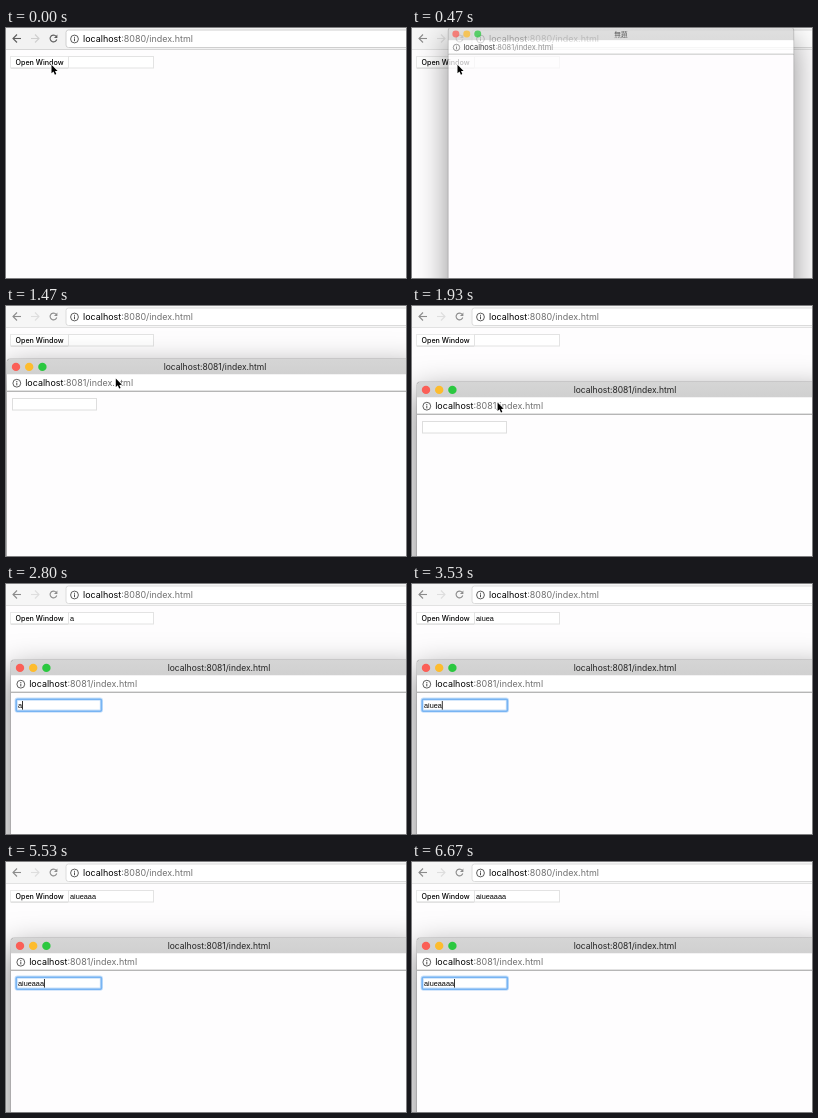
Animation of 400x250 px, one loop 6.79 s. Source, as an HTML page with a canvas:

```html
<!DOCTYPE html>
<html lang="en">
<head>
<meta charset="utf-8">
<title>Linked inputs</title>
<style>
html, body { margin: 0; width: 100%; height: 100%; overflow: hidden; background: #fefefe; }
canvas { display: block; width: 400px; height: 250px; }
</style>
</head>
<body>
<canvas id="stage"></canvas>
<script>
const W = 400, H = 250, LOOP = 6790, STEP = 1000 / 15;
const UI = 'Inter, Roboto, sans-serif';
const FIELD = '"Liberation Sans", Arial, sans-serif';
const CJK = '"Noto Sans CJK JP", "Noto Sans CJK", sans-serif';
const PAGE = '#fefdfe';
const POPUP = { w: 416, h: 346 };

const canvas = document.getElementById('stage');
const ctx = canvas.getContext('2d');
const dpr = window.devicePixelRatio || 1;
canvas.width = W * dpr;
canvas.height = H * dpr;

const mix = (a, b, p) => a + (b - a) * p;
const clamp = v => Math.max(0, Math.min(1, v));
const ease = p => p * p * (3 - 2 * p);

// [tick, number of characters]
const TYPING = [
  [39, 1], [43, 2], [44, 3], [45, 4], [46, 5], [47, 6], [48, 5], [49, 4],
  [53, 5], [56, 6], [59, 7], [62, 8], [67, 7], [69, 6], [71, 5],
  [73, 4], [76, 5], [79, 6], [82, 7], [84, 8]
];
// window and cursor while the popup is dragged, one entry per tick from 20
const DRAG = [
  { x: 1, y: -9, cx: 107, cy: 18.5 },
  { x: 1, y: 24, cx: 108.5, cy: 50 },
  { x: 1, y: 53, cx: 109.8, cy: 72.5 },
  { x: 5, y: 76, cx: 111, cy: 79 }
];

function rect(x, y, w, h, color) {
  ctx.fillStyle = color;
  ctx.fillRect(x, y, w, h);
}

function frame(x, y, w, h, color, fill) {
  rect(x, y, w, h, fill);
  ctx.strokeStyle = color;
  ctx.lineWidth = 1;
  ctx.strokeRect(x + .5, y + .5, w - 1, h - 1);
}

function text(str, x, y, size, color, family = UI, align = 'left', weight = 400) {
  ctx.font = `${weight} ${size}px ${family}`;
  ctx.textAlign = align;
  ctx.textBaseline = 'alphabetic';
  ctx.fillStyle = color;
  ctx.fillText(str, x, y);
  return ctx.measureText(str).width;
}

function line(points, color, width) {
  ctx.beginPath();
  points.forEach(([x, y]) => ctx.lineTo(x, y));
  ctx.strokeStyle = color;
  ctx.lineWidth = width;
  ctx.stroke();
}

function topRounded(x, y, w, h, r) {
  ctx.moveTo(x, y + h);
  ctx.lineTo(x, y + r);
  ctx.quadraticCurveTo(x, y, x + r, y);
  ctx.lineTo(x + w - r, y);
  ctx.quadraticCurveTo(x + w, y, x + w, y + r);
  ctx.lineTo(x + w, y + h);
  ctx.closePath();
}

function infoIcon(x, y) {
  ctx.beginPath();
  ctx.arc(x, y, 3.9, 0, Math.PI * 2);
  ctx.strokeStyle = '#4c4c4c';
  ctx.lineWidth = .9;
  ctx.stroke();
  rect(x - .5, y - .6, 1, 2.8, '#4c4c4c');
  rect(x - .5, y - 2.2, 1, 1, '#4c4c4c');
}

function address(port, x, y, size) {
  const host = text('localhost', x, y, size, '#000');
  text(`:${port}/index.html`, x + host, y, size, '#707070');
}

function arrow(x, y, dir, color) {
  line([[x - 4 * dir, y], [x + 4 * dir, y]], color, 1.1);
  line([[x, y - 4], [x + 4 * dir, y], [x, y + 4]], color, 1.1);
}

function reload(x, y, color) {
  ctx.beginPath();
  ctx.arc(x, y, 3.4, .3, Math.PI * 1.75);
  ctx.strokeStyle = color;
  ctx.lineWidth = 1.1;
  ctx.stroke();
  ctx.beginPath();
  ctx.moveTo(x + 3.9, y - 4);
  ctx.lineTo(x + 3.9, y - .5);
  ctx.lineTo(x + .5, y - .5);
  ctx.fillStyle = color;
  ctx.fill();
}

function mainWindow(active, pressed, value) {
  rect(0, 0, W, H, PAGE);
  rect(0, 0, W, 21, active ? '#f2f2f2' : '#f6f6f6');
  rect(0, 21, W, 1, active ? '#d6d6d6' : '#e2e2e2');
  const ink = active ? '#5c5c5c' : '#8c8c8c';
  arrow(11, 10.5, -1, ink);
  arrow(29, 10.5, 1, active ? '#cfcfcf' : '#dedede');
  reload(47.5, 10.5, ink);

  ctx.beginPath();
  ctx.roundRect(60, 2, 360, 17.5, 2.5);
  ctx.fillStyle = '#fff';
  ctx.fill();
  ctx.strokeStyle = active ? '#cbcbcb' : '#d8d8d8';
  ctx.lineWidth = .9;
  ctx.stroke();
  infoIcon(68.5, 11);
  address(8080, 77, 13.9, 8.95);

  frame(4, 28, 59, 12.5, '#e9e9e9', pressed ? '#d6d6d6' : '#fff');
  rect(5, 39.7, 57, .8, '#d2d2d2');
  text('Open Window', 9.5, 37.3, 7.15, '#000', UI, 'left', 500);
  frame(62, 28, 86, 12.5, '#e3e3e3', '#fff');
  text(value, 64, 37.3, 7.3, '#000', FIELD);
}

function popupShadow(x, y, w, h, alpha) {
  ctx.save();
  ctx.beginPath();
  ctx.rect(-100, -100, W + 200, H + 200);
  topRounded(x, y, w, h, 3.5);
  ctx.clip('evenodd');
  ctx.globalAlpha = alpha;
  ctx.shadowColor = 'rgba(0,0,0,.5)';
  ctx.shadowBlur = 32 * dpr;
  ctx.shadowOffsetY = 11 * dpr;
  ctx.beginPath();
  topRounded(x, y, w, h, 3.5);
  ctx.fillStyle = '#000';
  ctx.fill();
  ctx.shadowColor = 'transparent';
  ctx.strokeStyle = 'rgba(0,0,0,.14)';
  ctx.lineWidth = 1.4;
  ctx.stroke();
  ctx.restore();
}

function popupField(value, focused, caret) {
  frame(5, 39, 85, 12.5, '#dedede', '#fff');
  if (focused) {
    [[3.2, '#c9e1fa'], [1.6, '#78b4f3']].forEach(([width, color]) => {
      ctx.beginPath();
      ctx.roundRect(5.2, 39.2, 85.2, 12, 1.2);
      ctx.strokeStyle = color;
      ctx.lineWidth = width;
      ctx.stroke();
    });
  }
  const end = 7 + text(value, 7, 48.3, 7.3, '#000', FIELD);
  if (caret) rect(end, 41, .8, 8.6, '#000');
}

function popup({ x, y, scale, alpha, loaded, value, focused, caret }) {
  const { w, h } = POPUP;
  const left = x + w * (1 - scale) / 2;
  const top = y + h * (1 - scale) / 2;
  popupShadow(left, top, w * scale, h * scale, Math.min(1, alpha * 1.2));

  ctx.save();
  ctx.globalAlpha = alpha;
  ctx.translate(left, top);
  ctx.scale(scale, scale);

  const bar = ctx.createLinearGradient(0, 0, 0, 15.5);
  bar.addColorStop(0, '#d5d5d5');
  bar.addColorStop(1, '#d0d0d0');
  ctx.beginPath();
  topRounded(0, 0, w, 15.5, 3.5);
  ctx.fillStyle = bar;
  ctx.fill();
  ['#fb5f57', '#fdbc2e', '#2bc840'].forEach((color, i) => {
    ctx.beginPath();
    ctx.arc(9 + 13.2 * i, 7.9, 4.2, 0, Math.PI * 2);
    ctx.fillStyle = color;
    ctx.fill();
  });
  if (loaded) text('localhost:8081/index.html', 208, 10.8, 8.5, '#222', UI, 'center');
  else text('無題', 208, 11.2, 8, '#333', CJK, 'center');

  rect(0, 15.5, w, 16.5, '#fff');
  infoIcon(9.8, 24.2);
  address(8081, 18.2, 27.4, 8.95);
  rect(0, 31.6, w, 1.4, '#b6b6b6');
  rect(0, 33, w, h - 33, PAGE);
  if (loaded) popupField(value, focused, caret);
  ctx.restore();
}

function pointer(x, y) {
  ctx.beginPath();
  [[0, 0], [0, 8.6], [2, 6.8], [3.4, 10], [4.8, 9.4], [3.5, 6.4], [6.1, 6.2]]
    .forEach(([dx, dy]) => ctx.lineTo(x + dx, y + dy));
  ctx.closePath();
  ctx.lineJoin = 'round';
  ctx.strokeStyle = '#fff';
  ctx.lineWidth = 1.5;
  ctx.stroke();
  ctx.fillStyle = '#000';
  ctx.fill();
  ctx.lineJoin = 'miter';
}

function beam(x, y) {
  rect(x - .5, y - 4.5, 1, 9, '#222');
  rect(x - 1.8, y - 5, 3.6, .9, '#222');
  rect(x - 1.8, y + 4.1, 3.6, .9, '#222');
}

function cursor(tick) {
  if (tick < 8) return pointer(45.5, 36.7);
  if (tick < 20) {
    const p = ease(clamp((tick - 7) / 5));
    return pointer(mix(45.5, 107, p), mix(36.7, -27, p));
  }
  if (tick < 24) {
    const { cx, cy } = DRAG[tick - 20];
    return pointer(cx, cy);
  }
  if (tick >= 39) return;
  const p = ease(clamp((tick - 25) / 9));
  const x = mix(111, 50, p), y = mix(79, 121, p);
  if (y > 115) beam(x, y);
  else pointer(x, y);
}

function draw(tick) {
  const typed = TYPING.filter(([at]) => at <= tick).pop();
  const value = 'aiueaaaa'.slice(0, typed ? typed[1] : 0);
  const lastKey = typed ? typed[0] : 34;
  const caretOn = Math.floor((tick - lastKey) / 8) % 2 === 0;

  ctx.setTransform(dpr, 0, 0, dpr, 0, 0);
  mainWindow(tick < 5, tick === 2 || tick === 3, value);
  if (tick >= 5) {
    const spot = tick < 20 ? { x: 1, y: -30 } : DRAG[Math.min(3, tick - 20)];
    popup({
      x: spot.x,
      y: spot.y,
      scale: Math.min(1, .83 + (tick - 7) * .1),
      alpha: Math.min(1, .75 + (tick - 7) * .2),
      loaded: tick >= 10,
      value,
      focused: tick >= 34,
      caret: tick >= 34 && caretOn
    });
  }
  cursor(tick);
}

function run() {
  const t = performance.now() % LOOP;
  draw(Math.floor((t + 5) / STEP));
  requestAnimationFrame(run);
}
run();
</script>
</body>
</html>
```
